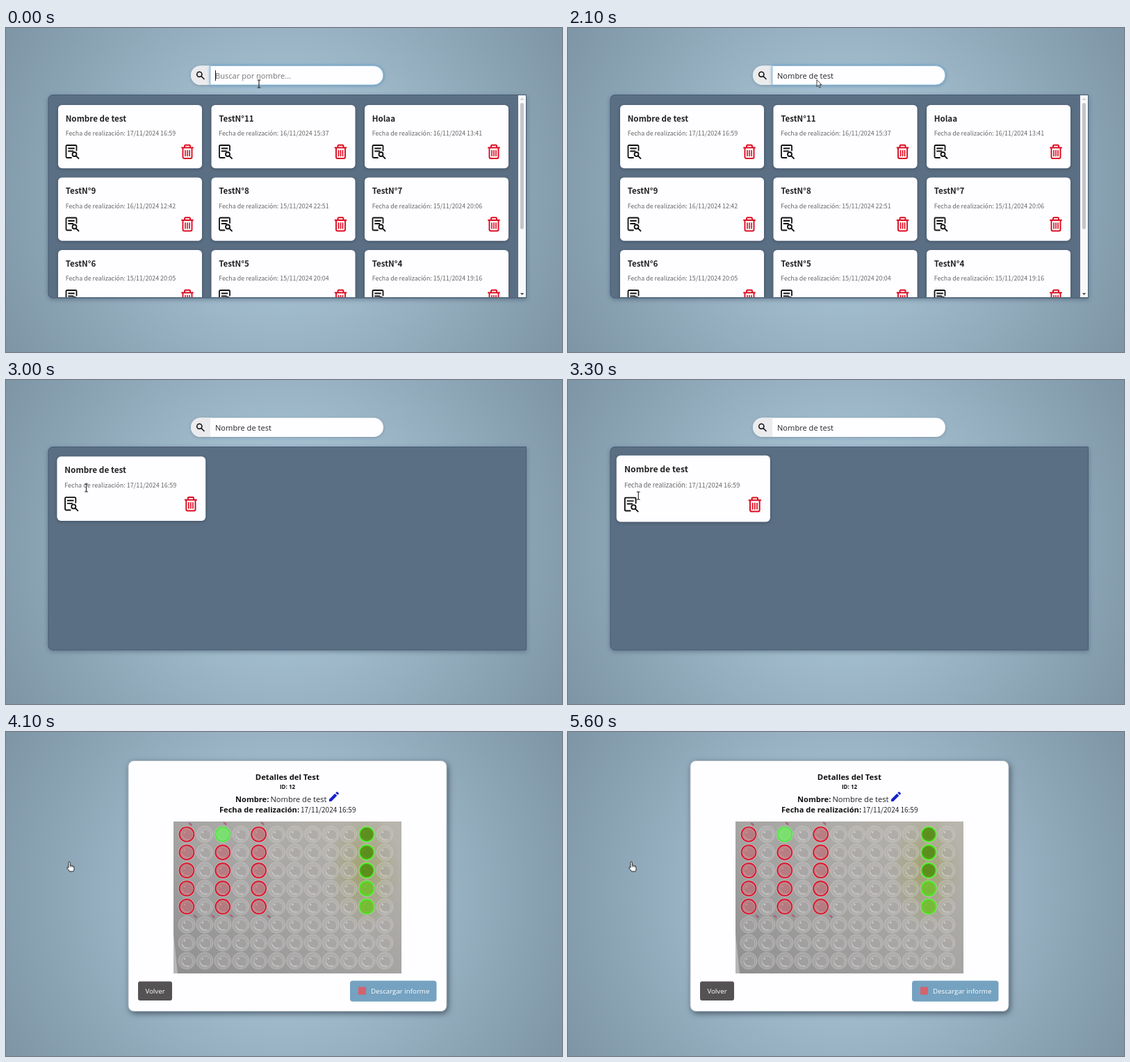
These frames come from a looping animation (800x467 px, 5700 ms). An HTML page:

```html
<!DOCTYPE html>
<html lang="es">
<head>
<meta charset="utf-8">
<title>Buscar test</title>
<style>
  html, body { margin: 0; width: 100%; height: 100%; overflow: hidden; }
  body { background: #97b0c0; }
  svg { display: block; width: 800px; height: 467px; }
  text { font: 11.1px "Open Sans", "Noto Sans", sans-serif; fill: #212529; white-space: pre; }
  .title, .date { font-family: "Noto Sans CJK JP", "Noto Sans CJK SC", "Noto Sans CJK", "Noto Sans", sans-serif; }
  .title { font-size: 11.6px; font-weight: 700; fill: #222; }
  .date { font-size: 8.87px; fill: #666; }
  .bold { font-weight: 700; fill: #111; }
  .panel { filter: drop-shadow(0 2px 3px rgba(30, 50, 70, .4)); }
  .card rect { fill: #fefdff; filter: drop-shadow(0 1px 2px rgba(20, 30, 45, .4)); }
  .modal { filter: drop-shadow(2px 3px 4px rgba(25, 40, 55, .6)); }
  .bar { filter: drop-shadow(0 1px 2px rgba(50, 80, 100, .3)); }
  .glow { filter: drop-shadow(0 0 2px #5f9dcb); }
  .line { fill: none; stroke-linecap: round; stroke-linejoin: round; }
</style>
</head>
<body>
<svg viewBox="0 0 800 467">
  <defs>
    <radialGradient id="sky" gradientUnits="userSpaceOnUse" cx="400" cy="233" r="463">
      <stop offset="0" stop-color="#b4d0e2"/><stop offset="1" stop-color="#7d95a5"/>
    </radialGradient>
    <linearGradient id="plate" x1="0" y1="1" x2="1" y2="0">
      <stop offset="0" stop-color="#8e8e8f"/><stop offset=".45" stop-color="#a4a3a2"/>
      <stop offset="1" stop-color="#b9b6ae"/>
    </linearGradient>
    <radialGradient id="tint">
      <stop offset="0" stop-color="#96993c" stop-opacity=".55"/>
      <stop offset="1" stop-color="#96993c" stop-opacity="0"/>
    </radialGradient>
    <clipPath id="listBox"><rect x="61" y="97" width="687" height="291"/></clipPath>
    <clipPath id="photoBox"><rect x="241" y="129" width="328" height="219"/></clipPath>

    <g id="review" class="line" stroke="#111" stroke-width="1.8">
      <path d="M16 8.5V2.5Q16 1 14.5 1H2.5Q1 1 1 2.5V17.5Q1 19 2.500 19H8.500M4.500 5.500H12.500M4.500 9.500H11"/>
      <circle cx="13" cy="14" r="3"/>
      <path d="M15.300 16.300L19 20"/>
    </g>
    <g id="trash" class="line" stroke="#dc0c20" stroke-width="1.9">
      <path d="M-8 4.500H8M-4 4V2Q-4 .8-2.800 .8H2.800Q4 .8 4 2V4M-6.500 5V18Q-6.500 20-4.500 20H4.500Q6.500 20 6.500 18V5"/>
      <path d="M-3 8.500V16.500M0 8.500V16.500M3 8.500V16.500" stroke-width="1.6"/>
    </g>
  </defs>

  <rect width="800" height="467" fill="url(#sky)"/>

  <g id="search">
    <rect class="bar" x="266" y="54.500" width="277" height="27.500" rx="13.750" fill="#fefdff"/>
    <path d="M294 54.500H279.750a13.750 13.750 0 0 0 0 27.500H294Z" fill="#ebebed"/>
    <path id="focus" class="glow" d="M294 54.500H529a13.750 13.750 0 0 1 0 27.500H294Z" fill="#fefdff" stroke="#8dbad9" stroke-width=".8"/>
    <g class="line" stroke="#111" stroke-width="1.6">
      <circle cx="278.300" cy="66.800" r="3.600"/><path d="M281.200 69.700L285 73.500"/>
    </g>
    <text id="query" x="301" y="72.500"></text>
    <rect id="caret" y="61" width="1" height="15" fill="#111"/>

    <path class="panel" d="M68 96.500H748.500V389H68Q61 389 61 382V103.500Q61 96.500 68 96.500Z" fill="#5b6f84" stroke="#465c75"/>
    <g id="all" clip-path="url(#listBox)"></g>
    <g id="found"></g>
  </g>

  <g id="details">
    <rect class="modal" x="176" y="41.500" width="458" height="361" rx="8" fill="#fefdff" stroke="#b4bcc3"/>
    <text class="bold" x="404.800" y="68.700" text-anchor="middle" style="font-size:11.3px">Detalles del Test</text>
    <text class="bold" x="405" y="81.500" text-anchor="middle" style="font-size:8px">ID: 12</text>
    <text class="bold" x="330" y="101">Nombre:</text>
    <text x="380.500" y="101">Nombre de test</text>
    <path d="M465 100V97L473.300 88.700L476.300 91.700L468 100ZM474.200 87.800L475.600 86.400Q476.300 85.800 477 86.400L478.600 88Q479.200 88.700 478.600 89.400L477.200 90.800Z" fill="#1420cc"/>
    <text class="bold" x="307" y="115.500">Fecha de realización:</text>
    <text class="date" x="424" y="115.500" style="font-size:10px;fill:#212529">17/11/2024 16:59</text>
    <g id="photo" clip-path="url(#photoBox)"></g>
    <rect x="190" y="359.500" width="49" height="27.500" rx="3" fill="#555254"/>
    <text x="214.500" y="376.600" text-anchor="middle" style="font-size:9.72px;fill:#fff">Volver</text>
    <rect x="495" y="358.500" width="124.500" height="30" rx="4" fill="#74a2c0"/>
    <rect x="507" y="367.500" width="11" height="11" fill="#d8616c"/>
    <text x="525" y="376.600" style="font-size:9.72px;fill:#fff">Descargar informe</text>
  </g>

  <g id="pointer" stroke-linejoin="round"></g>
</svg>

<script>
const $ = id => document.getElementById(id);
const LOOP = 5700, STEP = 100;
const PHRASE = "Nombre de test";

const TESTS = [
  [PHRASE, "17/11/2024 16:59"], ["TestN°11", "16/11/2024 15:37"], ["Holaa", "16/11/2024 13:41"],
  ["TestN°9", "16/11/2024 12:42"], ["TestN°8", "15/11/2024 22:51"], ["TestN°7", "15/11/2024 20:06"],
  ["TestN°6", "15/11/2024 20:05"], ["TestN°5", "15/11/2024 20:04"], ["TestN°4", "15/11/2024 19:16"]
];

const card = ([name, date], x, y, w) => `
  <g class="card" transform="translate(${x} ${y})">
    <rect width="${w}" height="91.200" rx="5.500"/>
    <text class="title" x="10.700" y="23.600">${name}</text>
    <text class="date" x="10.700" y="44">Fecha de realización: ${date}</text>
    <use href="#review" x="10.500" y="57"/>
    <use href="#trash" x="${w - 21}" y="57"/>
  </g>`;

const scrollbar = `
  <rect x="737" y="97" width="11" height="291" fill="#f8f8fa"/>
  <rect x="740" y="108" width="5" height="182" rx="2.500" fill="#c2c5cc"/>
  <path class="line" d="M740.800 103.500L742.600 101.700L744.400 103.500" stroke="#999"/>
  <path d="M740 382H745.200L742.600 385Z" fill="#444"/>`;

$("all").innerHTML = TESTS.map((test, i) =>
  card(test, 75 + i % 3 * 220.5, 111 + Math.floor(i / 3) * 104.5, 207)).join("") + scrollbar;
$("found").innerHTML = card(TESTS[0], 75, 111, 210.6);

// Microplate: 12 x 8 wells, some marked red or green
const circle = (x, y, r, attrs) => `<circle cx="${x}" cy="${y}" r="${r}" ${attrs}/>`;

function well(col, row) {
  const x = 260 + col * 25.9, y = 147.5 + row * 26.05;
  const marked = row < 5;
  let out = circle(x, y, 12, 'fill="#c9c8c6" fill-opacity=".3" stroke="#d6d5d3" stroke-opacity=".45"')
    + circle(x + 1, y + 1, 8, 'fill="#8b8986" fill-opacity=".2" stroke="#e2e1df" stroke-opacity=".35"')
    + `<path class="line" d="M${x - 6} ${y + 3}a7 7 0 0 0 9 4" stroke="#eee" stroke-opacity=".5" stroke-width="1.2"/>`
    + circle(x - 3, y - 3, 1.2, 'fill="#fff" fill-opacity=".45"');
  const mark = (fill, line, alpha) =>
    circle(x, y, 10.5, `fill="${fill}" fill-opacity="${alpha}" stroke="${line}" stroke-width="1.7"`);
  if (marked && col === 2 && row === 0) out += mark("#72e866", "#4cea3e", .85);
  else if (marked && (col === 0 || col === 2 || col === 4)) out += mark("#c94652", "#e20f28", .42);
  else if (marked && col === 10) out += mark(row < 3 ? "#4d8a08" : "#6fbd25", "#45f01e", .85);
  return out;
}

const labels = [[265, 133], [315, 132], [369, 132], [272, 266], [298, 266], [324, 265], [378, 266]];
let plate = `<rect x="241" y="129" width="328" height="219" fill="url(#plate)"/>
  <ellipse cx="515" cy="200" rx="52" ry="85" fill="url(#tint)"/>
  <path d="M241 290L247 348H241Z" fill="#d0d0d0" opacity=".6"/>`;
for (let row = 0; row < 8; row++)
  for (let col = 0; col < 12; col++) plate += well(col, row);
labels.forEach(([x, y], i) => {
  plate += `<path d="M${x - 2} ${y - 2}l4 4" stroke="#b84d60" stroke-width="2" opacity=".75"/>
    <path d="M${x} ${y - 2}l3 3" stroke="${i % 3 ? "#8a7595" : "#506cba"}" opacity=".8"/>`;
});
$("photo").innerHTML = plate;

const SHAPES = {
  beam: `<path class="line" d="M-2-5.500H-.7L0-5L.7-5.500H2M0-5V5M-2 5.500H-.7L0 5L.7 5.500H2" stroke="#222" stroke-width="1.1"/>`,
  arrow: `<path d="M0 0V10L2.300 7.800L3.900 11.500L5.500 10.800L3.900 7.300H7Z" fill="#fff" stroke="#111" stroke-width=".8"/>`,
  hand: `<path d="M0 1.500Q0 0 1.200 0Q2.400 0 2.400 1.500V5.500Q3.400 4.800 4.300 5.600Q5.300 5.200 6 6.200Q8 6 8 8V11Q7.700 13 6.700 14H1.600Q0 11.500-2.400 9Q-2.400 7.400-.6 8L0 8.600Z" fill="#fff" stroke="#111" stroke-width=".9"/>
    <path d="M2.400 5.500V8M4.300 5.700V8M6.100 6.300V8.500" stroke="#111" stroke-width=".6"/>`
};

// time, x, y, shape
const PATH = [
  [0, 364, 80.5, "beam"], [1600, 364, 80.5, "beam"], [1800, 361, 77, "arrow"],
  [2100, 358, 74.5, "arrow"], [2600, 358, 74.5, "arrow"], [2700, 325, 88, "arrow"],
  [2900, 158, 143, "beam"], [3000, 115.5, 155.5, "beam"], [3200, 104, 162, "beam"],
  [3600, 93, 181, "hand"], [3800, 90, 187, "hand"], [LOOP, 90, 187, "hand"]
];

// characters typed after each step
const TYPED = [0, 1, 1, 2, 3, 3, 4, 5, 6, 7, 9, 10, 10, 11, 13, 14];

let shape = "";
function movePointer(t) {
  const i = PATH.findIndex(key => key[0] > t) - 1;
  const [t0, x0, y0, kind] = PATH[i], [t1, x1, y1] = PATH[i + 1];
  const p = (t - t0) / (t1 - t0);
  if (kind !== shape) $("pointer").innerHTML = SHAPES[shape = kind];
  $("pointer").setAttribute("transform", `translate(${x0 + (x1 - x0) * p} ${y0 + (y1 - y0) * p})`);
}

let shown = -1;
function type(t) {
  const count = TYPED[Math.min(t / STEP, TYPED.length - 1)];
  const query = $("query");
  if (count !== shown) {
    shown = count;
    query.textContent = count ? PHRASE.slice(0, count) : "Buscar por nombre...";
    query.style.fill = count ? "#212529" : "#757575";
  }
  const width = count ? query.getSubStringLength(0, count) : 0;
  $("caret").setAttribute("x", Math.round(301 + width));
}

const show = (id, on) => { $(id).style.display = on ? "" : "none"; };

function draw(t) {
  const filtered = t >= 2200, open = t >= 4100;
  show("search", !open);
  show("details", open);
  show("all", !filtered);
  show("found", filtered);
  show("focus", !filtered);
  show("caret", t < 1700);
  if (!open) type(t);
  const p = Math.min(Math.max((t - 2950) / 300, 0), 1);
  const scale = 1 + .05 * (1 - (1 - p) ** 2);
  $("found").setAttribute("transform", `translate(180.300 156.800) scale(${scale}) translate(-180.300 -156.800)`);
  movePointer(t);
}

const start = performance.now();
function tick() {
  const t = (performance.now() - start) % LOOP;
  draw(Math.floor(t / STEP) * STEP);
  requestAnimationFrame(tick);
}
tick();
</script>
</body>
</html>
```
